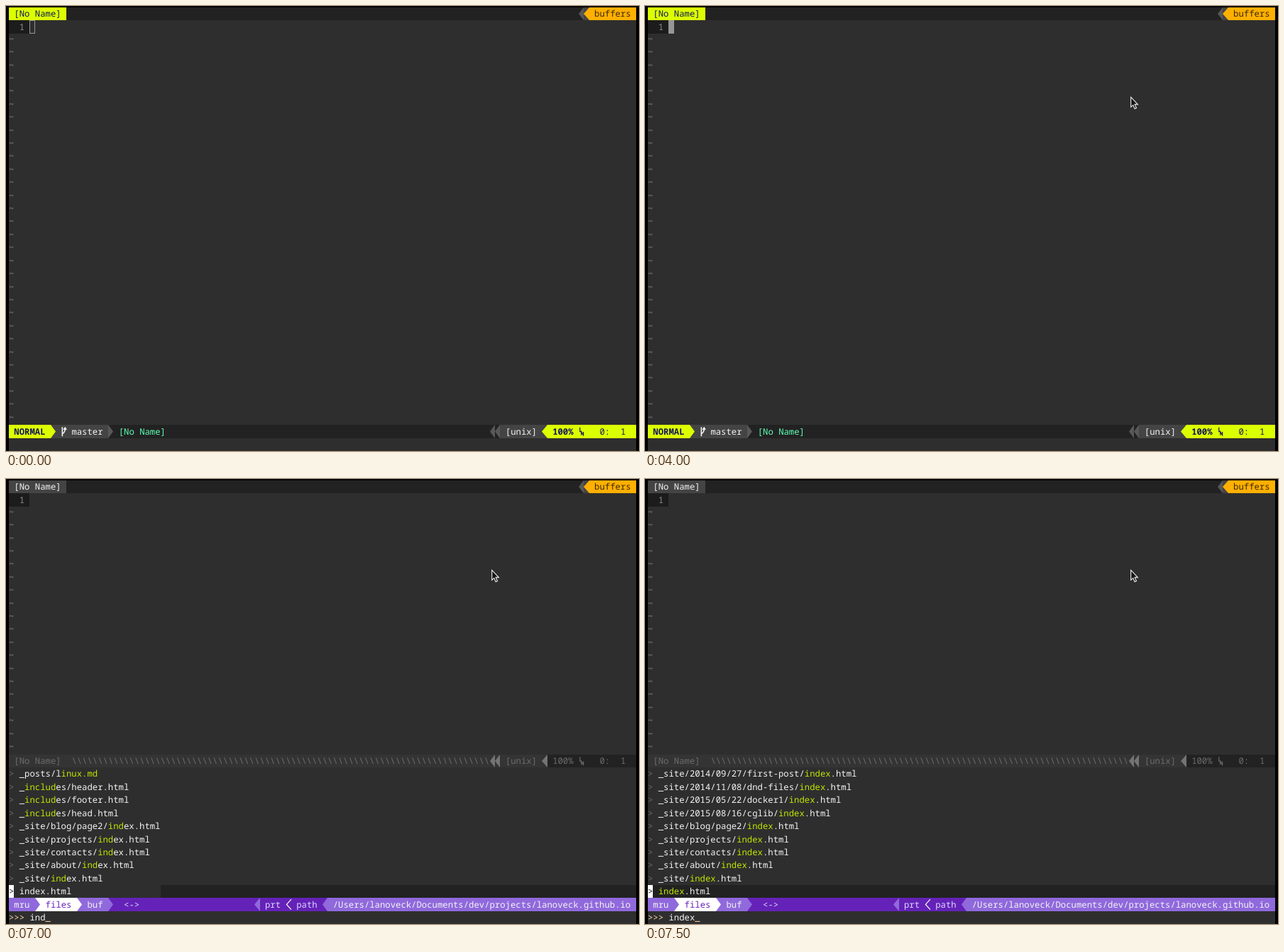
Write an HTML page that moves like this. It is 892 px wide and 628 px high and loops after 8 s.

```html
<!DOCTYPE html>
<html lang="en">
<head>
<meta charset="utf-8">
<title>Editor file finder</title>
<style>
  html, body { margin: 0; width: 100%; height: 100%; overflow: hidden; background: #000; }
  svg { display: block; width: 892px; height: 628px; }
  text {
    font-family: "Noto Sans Mono", "DejaVu Sans Mono", monospace;
    font-weight: 500;
    white-space: pre;
    text-rendering: geometricPrecision;
  }
</style>
</head>
<body>
<svg id="stage" viewBox="0 0 892 628" xmlns="http://www.w3.org/2000/svg"></svg>
<script>
const LOOP = 8000;
const COLS = 120, ROWS = 34;
const LEFT = 4, TOP = 2, CELL = 884 / COLS, LINE = 626 / ROWS;
const FONT_SIZE = CELL / 0.6;

const C = {
  bg: '#2e2e2e', bar: '#222222', gutter: '#1c1c1c', mid: '#444444', inactive: '#343434',
  arrow: '#585858', dim: '#6c6c6c', faint: '#8a8a8a', white: '#f4f4f4',
  yellow: '#dcff00', navy: '#16165a', orange: '#ffb000', mint: '#5fffb4',
  purple: '#6522b8', violet: '#9069dc', lilac: '#dcd7ff', match: '#bfe600', prompt: '#ffd9ae'
};

const HOME = '/Users/lanoveck/Documents/dev/projects/lanoveck.github.io';

const pages = ['_site/2015/08/16/cglib/index.html', '_site/blog/page2/index.html',
  '_site/projects/index.html', '_site/contacts/index.html', '_site/about/index.html',
  '_site/index.html', 'index.html'];
const includes = ['_includes/header.html', '_includes/footer.html', '_includes/head.html'];

const searches = [
  { at: 5000, query: '', settled: true, files: ['_posts/ideas', '_site/CNAME', '_config.yml',
    'favicon.ico', 'projects.md', 'contacts.md', 'index.html', 'feed.xml', 'about.md', 'CNAME'] },
  { at: 6750, query: 'i', files: ['_includes/head.html', '_posts/vim.markdown',
    '_site/favicon.ico', '_site/index.html', '_site/feed.xml', '_posts/ideas', '_site/CNAME',
    '_config.yml', 'favicon.ico', 'index.html'] },
  { at: 7000, query: 'ind', files: ['_posts/linux.md', ...includes, ...pages.slice(1)] },
  { at: 7250, query: 'inde', files: [...includes, ...pages] },
  { at: 7500, query: 'index', settled: true, files: ['_site/2014/09/27/first-post/index.html',
    '_site/2014/11/08/dnd-files/index.html', '_site/2015/05/22/docker1/index.html', ...pages] }
];

const px = col => LEFT + col * CELL;
const py = row => TOP + row * LINE;
const escapeText = s => s.replace(/&/g, '&amp;').replace(/</g, '&lt;').replace(/>/g, '&gt;');

const rect = (x, y, w, h, fill, extra = '') =>
  `<rect x="${x}" y="${y}" width="${w}" height="${h}" fill="${fill}" ${extra}/>`;
// Snapping cell edges to pixels keeps neighbouring blocks free of seams.
function block(row, from, to, fill) {
  const x = Math.round(px(from)), y = Math.round(py(row));
  return rect(x, y, Math.round(px(to)) - x, Math.round(py(row + 1)) - y, fill);
}
const markup = (row, col, inner, fill, extra = '') =>
  `<text x="${px(col)}" y="${py(row) + 13.4}" font-size="${FONT_SIZE}" fill="${fill}" ${extra}>${inner}</text>`;
const write = (row, col, s, fill, extra) => markup(row, col, escapeText(s), fill, extra);

function wedge(row, col, fill, back, dir) {
  const x0 = Math.round(px(col)), x1 = Math.round(px(col + 1));
  const y0 = Math.round(py(row)), y1 = Math.round(py(row + 1));
  const [base, tip] = dir > 0 ? [x0, x1] : [x1, x0];
  return block(row, col, col + 1, back) +
    `<path d="M${base} ${y0}L${tip} ${(y0 + y1) / 2}L${base} ${y1}Z" fill="${fill}"/>`;
}
const wedgeRight = (row, col, fill, back) => wedge(row, col, fill, back, 1);
const wedgeLeft = (row, col, fill, back) => wedge(row, col, fill, back, -1);

const lineSign = (row, color) =>
  `<path transform="translate(${px(109)} ${py(row)})" d="M1.8 3.5V9.5H4.2M3.8 14.5V9.8L6.6 14.5V9.8" fill="none" stroke="${color}" stroke-width="1.2"/>`;

const branchSign = row =>
  `<path transform="translate(${px(10)} ${py(row)})" d="M1.7 3V16M1.7 12.5Q5.6 10.5 5.6 5M3.6 6.8L5.6 4L7.4 6.8" fill="none" stroke="${C.white}" stroke-width="1.6"/>`;

function tabLine(active) {
  return block(0, 0, COLS, C.bar) +
    block(0, 0, 11, active ? C.yellow : C.mid) +
    write(0, 1, '[No Name]', active ? C.navy : C.white) +
    wedgeLeft(0, 109, C.arrow, C.bar) + wedgeLeft(0, 110, C.orange, C.mid) +
    block(0, 111, COLS, C.orange) + write(0, 112, 'buffers', '#3a2800');
}

function buffer(lastRow) {
  let out = block(1, 0, 4, C.gutter) + write(1, 2, '1', C.faint);
  for (let row = 2; row <= lastRow; row++) out += write(row, 0, '~', C.faint, 'dy="-1.5"');
  return out;
}

function position(row, color, weight) {
  return write(row, 104, '100%', color, `style="font-weight:${weight}"`) +
    lineSign(row, color) + write(row, 113, '0:', color) + write(row, 117, '1', color);
}

function activeStatus(row) {
  return block(row, 0, COLS, C.bar) +
    block(row, 0, 8, C.yellow) + write(row, 1, 'NORMAL', C.navy, 'style="font-weight:600"') +
    wedgeRight(row, 8, C.yellow, C.mid) + block(row, 9, 19, C.mid) +
    branchSign(row) + write(row, 12, 'master', C.white) +
    wedgeRight(row, 19, C.arrow, C.bar) + write(row, 21, '[No Name]', C.mint) +
    wedgeLeft(row, 92, C.arrow, C.bar) + wedgeLeft(row, 93, C.arrow, C.bar) +
    block(row, 94, 102, C.mid) + write(row, 95, '[unix]', C.white) +
    wedgeLeft(row, 102, C.yellow, C.mid) + block(row, 103, COLS, C.yellow) +
    position(row, C.navy, 600);
}

function inactiveStatus(row) {
  return block(row, 0, 103, C.inactive) + block(row, 103, COLS, C.bar) +
    write(row, 1, '[No Name]', C.dim) + write(row, 12, '\\'.repeat(80), C.dim) +
    wedgeLeft(row, 92, '#747474', C.inactive) + wedgeLeft(row, 93, '#747474', C.inactive) +
    write(row, 95, '[unix]', C.dim) + wedgeLeft(row, 102, '#747474', C.inactive) +
    position(row, C.dim, 500);
}

function finderStatus(row) {
  const cx = px(53), cy = py(row);
  return block(row, 0, COLS, C.purple) +
    block(row, 0, 5, C.violet) + write(row, 1, 'mru', C.white) +
    wedgeRight(row, 5, C.violet, '#fff') + block(row, 6, 13, '#fff') +
    write(row, 7, 'files', C.purple) + wedgeRight(row, 13, '#fff', C.violet) +
    block(row, 14, 19, C.violet) + write(row, 15, 'buf', C.white) +
    wedgeRight(row, 19, C.violet, C.purple) + write(row, 22, '<->', C.lilac) +
    wedgeLeft(row, 47, C.violet, C.purple) + write(row, 49, 'prt', C.lilac) +
    `<path d="M${cx + 7.5} ${cy + 2}L${cx + 1} ${cy + LINE / 2}L${cx + 7.5} ${cy + LINE - 2}" fill="none" stroke="${C.white}" stroke-width="1.3"/>` +
    write(row, 55, 'path', C.lilac) +
    wedgeLeft(row, 60, C.violet, C.purple) + block(row, 61, COLS, C.violet) +
    write(row, 62, HOME, C.white);
}

// Shortest in-order match of the query's letters.
function highlight(file, query) {
  if (!query) return file;
  const pattern = new RegExp([...query].join(`[^${query[0]}]*?`), 'g');
  return file.replace(pattern, m => `<tspan fill="${C.match}">${m}</tspan>`);
}

function fileList({ query, settled, files }) {
  const first = 22, last = first + files.length - 1;
  const longest = Math.max(...files.map(f => f.length));
  let out = block(last, settled ? 0 : longest + 2, COLS, C.bar) + block(last, 0, 1, '#fff');
  files.forEach((file, i) => {
    const row = first + i, current = row === last;
    const inner = current && !settled ? file : highlight(file, query);
    out += write(row, 0, '>', current ? '#222' : C.dim) + markup(row, 2, inner, C.white);
  });
  return out;
}

const promptLine = query =>
  write(33, 0, '>>>', C.prompt) + write(33, 4, query, C.white) +
  write(33, 4 + query.length, '_', C.prompt);

const caret = solid =>
  rect(33.5, 20.5, 7, 18, solid ? '#969696' : 'none', 'stroke="#969696"');

const pointer = (x, y) =>
  `<path transform="translate(${x} ${y})" d="M.7 .7V14.6L3.8 11.8L6.1 17L8.5 16L6.2 10.9H10.4Z" fill="#151515" stroke="#f2f2f2" stroke-width="1.1"/>`;

function scene(t) {
  const search = searches.filter(s => t >= s.at).pop();
  let out = rect(0, 0, 892, 628, '#000') + rect(4, 2, 884, 626, C.bg) + tabLine(!search);
  if (search) {
    out += buffer(20) + inactiveStatus(21) + fileList(search) + finderStatus(32) +
      promptLine(search.query);
  } else {
    out += buffer(31) + activeStatus(32) + caret(t >= 4000);
  }
  if (t >= 1000) out += pointer(684, 128);
  else if (t >= 750) out += pointer(641, 157);
  return out;
}

const stage = document.getElementById('stage');
const cuts = [750, 1000, 4000, ...searches.map(s => s.at)];
let shown = -1;

function update(t) {
  const step = cuts.filter(c => t >= c).length;
  if (step === shown) return;
  shown = step;
  stage.innerHTML = scene(t);
}

const start = performance.now();
function tick() {
  update((performance.now() - start) % LOOP);
  requestAnimationFrame(tick);
}
tick();
</script>
</body>
</html>
```
